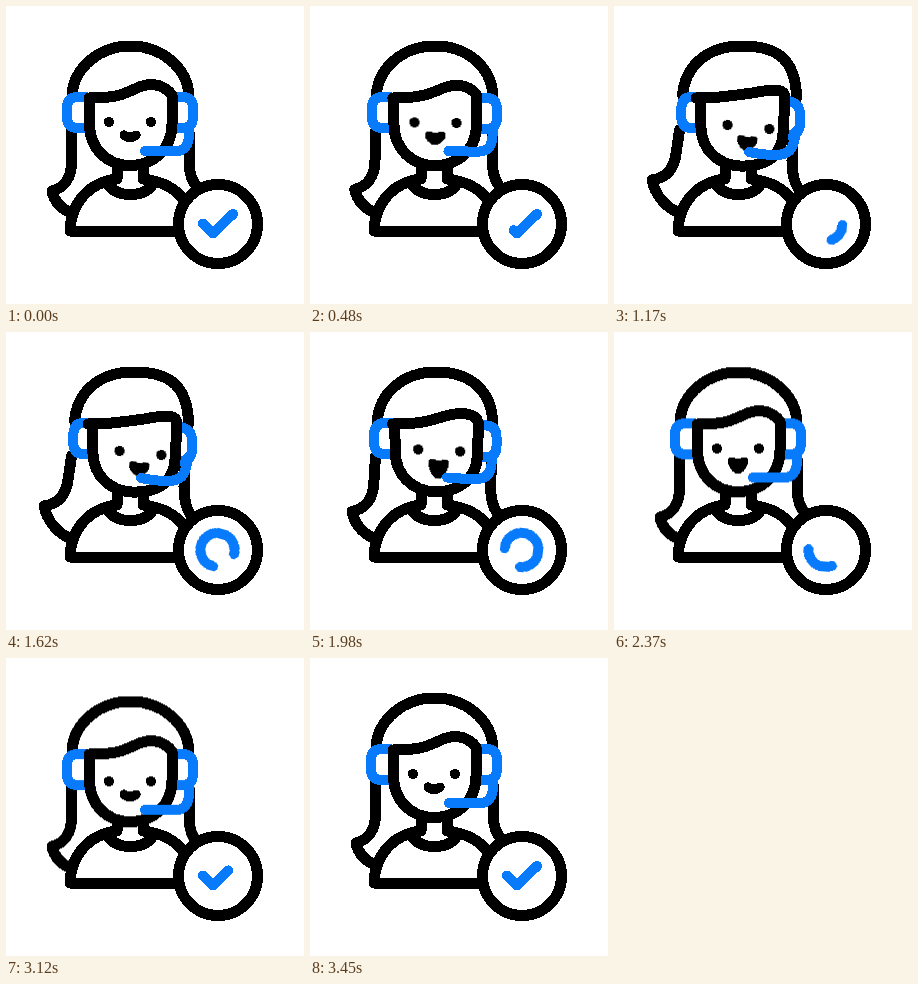
An HTML page that plays this animation: 298 px wide and 298 px high, repeating every 3600 ms.

```html
<!DOCTYPE html>
<html lang="en">
<head>
<meta charset="utf-8">
<title>Support agent</title>
<style>
html, body { margin: 0; width: 100%; height: 100%; overflow: hidden; background: #fff; }
svg { display: block; width: 100vw; height: 100vh; shape-rendering: crispEdges; }
path, circle { fill: none; stroke: #000; stroke-width: 11; stroke-linecap: round; stroke-linejoin: round; }
.blue { stroke: #077bfb; stroke-width: 10; }
.white { fill: #fff; }
.eye { fill: #000; stroke: none; }

/* --a: facing forward, --b: turned to the side, --n: depth of the nod */
.turn { d: var(--a); animation: turn 3.6s ease-in-out infinite; }
.nod { animation: nod 3.6s ease-in-out infinite; }
.look { transform-origin: 124px 116px; animation: look 3.6s ease-in-out infinite; }
.mouth { fill: #000; stroke-width: 9; animation: talk 3.6s ease-in-out infinite; }
.check { animation: check 3.6s linear infinite; }
.ring { transform-origin: 211.5px 218px; animation: spin 3.6s linear infinite, ring 3.6s ease-in-out infinite; }

@keyframes turn {
  0%, 9.17%, 64.17%, 100% { d: var(--a); }
  25%, 45.83% { d: var(--b); }
}
@keyframes look {
  0%, 9.17%, 64.17%, 100% { transform: translate(0, 0) rotate(0deg); }
  25%, 45.83% { transform: translate(10.5px, 5px) rotate(5.5deg); }
}
@keyframes nod {
  0%, 64.17%, 95.83%, 100% { transform: translateY(0); }
  74.44%, 81.94% { transform: translateY(var(--n)); }
}
@keyframes talk {
  0%, 9.17%, 84%, 100% { d: path("M118 129Q124 132 130 129Q124 135 118 129Z"); }
  21.67%, 38.33%, 55% { d: path("M118 129Q124 132 130 129Q124 151 118 129Z"); }
  30%, 46.67%, 75% { d: path("M118 129Q124 132 130 129Q124 140 118 129Z"); }
}
@keyframes check {
  0%, 9.17% { stroke-dasharray: 100 200; stroke-dashoffset: 0; opacity: 1; }
  27.77% { stroke-dasharray: 0 200; stroke-dashoffset: -100; opacity: 1; }
  27.78% { stroke-dasharray: 0 200; stroke-dashoffset: -100; opacity: 0; }
  27.79%, 72.77% { stroke-dasharray: 0 200; stroke-dashoffset: 0; opacity: 0; }
  72.78% { stroke-dasharray: 0 200; stroke-dashoffset: 0; opacity: 1; }
  89.17%, 100% { stroke-dasharray: 100 200; stroke-dashoffset: 0; opacity: 1; }
}
@keyframes spin {
  0%, 27.78% { transform: rotate(-34deg); }
  72.22%, 100% { transform: rotate(326deg); }
}
@keyframes ring {
  0%, 27.77% { stroke-dasharray: 0 360; stroke-dashoffset: 0; opacity: 0; }
  27.78% { stroke-dasharray: 0 360; stroke-dashoffset: 0; opacity: 1; }
  41.67%, 58.33% { stroke-dasharray: 268 360; stroke-dashoffset: 0; opacity: 1; }
  72.22% { stroke-dasharray: 0 360; stroke-dashoffset: -268; opacity: 1; }
  72.23%, 100% { stroke-dasharray: 0 360; stroke-dashoffset: -268; opacity: 0; }
}
</style>
</head>
<body>
<svg viewBox="0 0 298 298">
  <!-- body -->
  <path d="M111 162V173C84 176 65 196 64 225H172"/>
  <path d="M137.500 162V173C151 175 167 179 178 194"/>
  <path d="M102 178C107 186 116 188.500 124 188.500C132 188.500 142 186 147 178"/>

  <!-- hair -->
  <g class="nod" style="--n:4.500px">
    <path class="turn" style="--a:path('M66 89C68 61 94 40 124.500 40C155 40 181 61 183 89');--b:path('M68.500 89C71 61 92 40 128 40C164 40 182 54 182.500 92')"/>
    <path class="turn" style="--a:path('M65.500 125L65.500 156C65.500 172 58 182 46 185C48 195 55 202 63 206');--b:path('M65.500 124L62 148C60 164 51 172 38 174C41 188 50 199 61 205')"/>
    <path class="turn" style="--a:path('M183.500 128L183.500 160C183.500 170 187 176 191 181');--b:path('M179 132L178 155C178 168 180 176 184 182')"/>
  </g>

  <!-- ear cups -->
  <g class="nod" style="--n:6.700px">
    <path class="turn blue" style="--a:path('M80 91L72 91Q61 91 61 102L61 111Q61 122 72 122L80 122');--b:path('M81 91L77 91Q68 91 67 104L67 110Q68 122 77 122L82 122')"/>
    <path class="turn blue" style="--a:path('M170 91L176 91Q187 91 187 102L187 111Q187 122 176 122L170 122');--b:path('M175 95L178 96Q186 99 186 108L186 118Q186 126 179 129L175 129')"/>
  </g>

  <!-- face -->
  <g class="nod" style="--n:5.700px">
    <path class="turn white" style="--a:path('M83.500 92L83.500 118C83.500 142 101 159.500 124 159.500C148 159.500 166 142 166 118L166 89');--b:path('M86 92L87 122C88 144 104 159 126 160C150 161 167 152 169 128L171 93')"/>
    <path class="turn" style="--a:path('M83 92C112 92 118 88 133 81C148 75 160 81 166 89');--b:path('M82 92C112 92 122 89 138 87C152 85 171 79 171 93')"/>
  </g>
  <g class="nod" style="--n:9.700px">
    <g class="look">
      <circle class="eye" cx="103" cy="116" r="5.200"/>
      <circle class="eye" cx="145" cy="116" r="5.200"/>
      <path class="mouth" d="M118 129Q124 132 130 129Q124 135 118 129Z"/>
    </g>
  </g>

  <!-- microphone -->
  <g class="nod" style="--n:9px">
    <path class="turn blue" style="--a:path('M183 122L183 128Q183 145 170 145Q155 145 139 145');--b:path('M182 125L180 136Q177 149 162 149Q150 149 135 146')"/>
  </g>

  <!-- badge -->
  <circle class="white" cx="212" cy="218" r="39.500"/>
  <path class="blue check" pathLength="100" d="M197 217.500L207 227.500L227 208"/>
  <circle class="blue ring" pathLength="360" cx="211.500" cy="218" r="17"/>
</svg>
</body>
</html>
```
